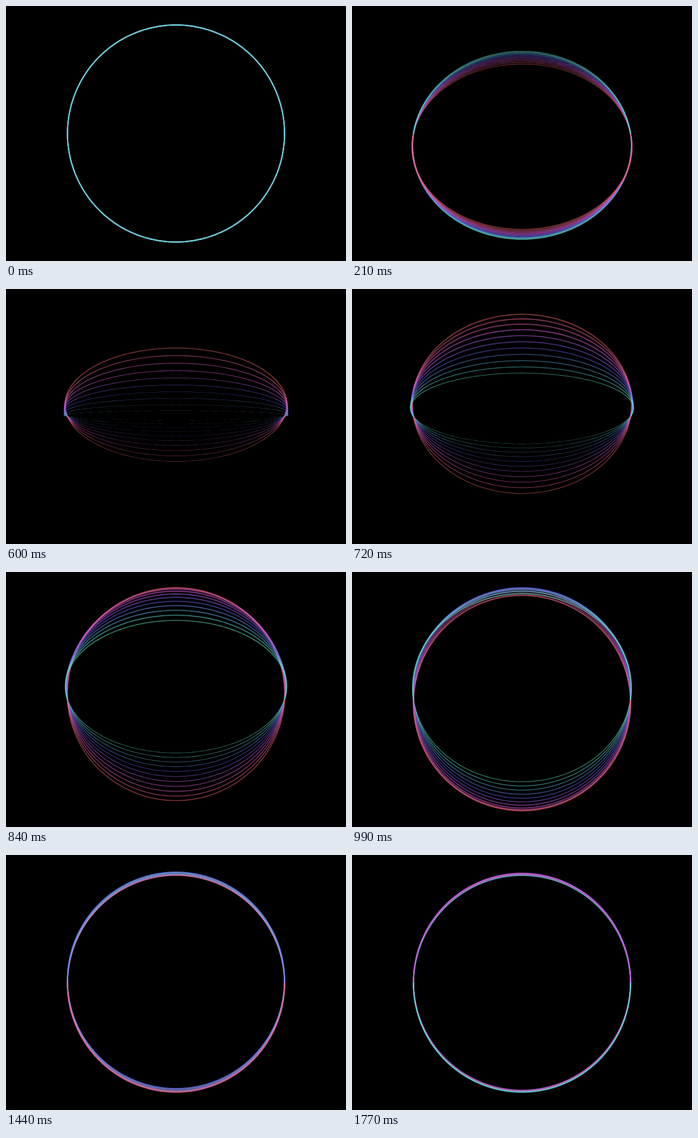
Animation of 600x450 px, one loop 1.8 s. Source, as an HTML page with a canvas:

```html
<!DOCTYPE html>
<html lang="en">
<head>
<meta charset="utf-8">
<title>Rings</title>
<style>
html, body { margin: 0; width: 100%; height: 100%; overflow: hidden; background: #000; }
canvas { display: block; width: 600px; height: 450px; }
</style>
</head>
<body>
<canvas id="stage" width="600" height="450"></canvas>
<script>
const ctx = document.getElementById('stage').getContext('2d');
const W = 600, H = 450, CX = 300, CY = 225;
const LOOP = 1800, STEP = 30;
const RINGS = 11, RADIUS = 191.5, LINE = 2, DEPTH = 800;
const SEGMENTS = 240;
const RAD = Math.PI / 180;

// Steady half turn, then a damped wobble around the rest pose (degrees).
function turn(u) {
  if (u < 900) return u * 0.2;
  const x = u - 900;
  return 180 + 10.4 * Math.exp(-0.0026 * x) * Math.sin(Math.PI * x / 195);
}

function circle(path, r, cos, sin) {
  for (let i = 0; i < SEGMENTS; i++) {
    const a = i / SEGMENTS * 2 * Math.PI;
    const y = r * Math.sin(a);
    const scale = DEPTH / (DEPTH - y * sin);
    path.lineTo(CX + r * Math.cos(a) * scale, CY + y * cos * scale);
  }
  path.closePath();
}

function makeRing(k, time) {
  const angle = turn(time / (1 + k / 30)) * RAD;
  const cos = Math.cos(angle), sin = Math.sin(angle);
  const path = new Path2D();
  circle(path, RADIUS + LINE / 2, cos, sin);
  const inner = new Path2D();
  circle(inner, RADIUS - LINE / 2, cos, sin);
  path.addPath(inner);
  return { path, tilt: Math.atan(sin / cos), color: `hsla(${360 - 20 * k}, 72%, 64%, 0.5)` };
}

function drawHalf(rings, top) {
  ctx.save();
  ctx.beginPath();
  ctx.rect(0, top, W, CY);
  ctx.clip();
  for (const ring of rings) {
    ctx.fillStyle = ring.color;
    ctx.fill(ring.path, 'evenodd');
  }
  ctx.restore();
}

function draw(time) {
  ctx.fillStyle = '#000';
  ctx.fillRect(0, 0, W, H);
  const rings = Array.from({ length: RINGS }, (_, k) => makeRing(k, time));
  // All planes share the horizontal axis, so tilt gives the depth order of each half.
  drawHalf([...rings].sort((a, b) => b.tilt - a.tilt), 0);
  drawHalf([...rings].sort((a, b) => a.tilt - b.tilt), CY);
}

const start = performance.now();
function tick() {
  const time = (performance.now() - start) % LOOP;
  draw(Math.floor(time / STEP) * STEP);
  requestAnimationFrame(tick);
}
tick();
</script>
</body>
</html>
```
